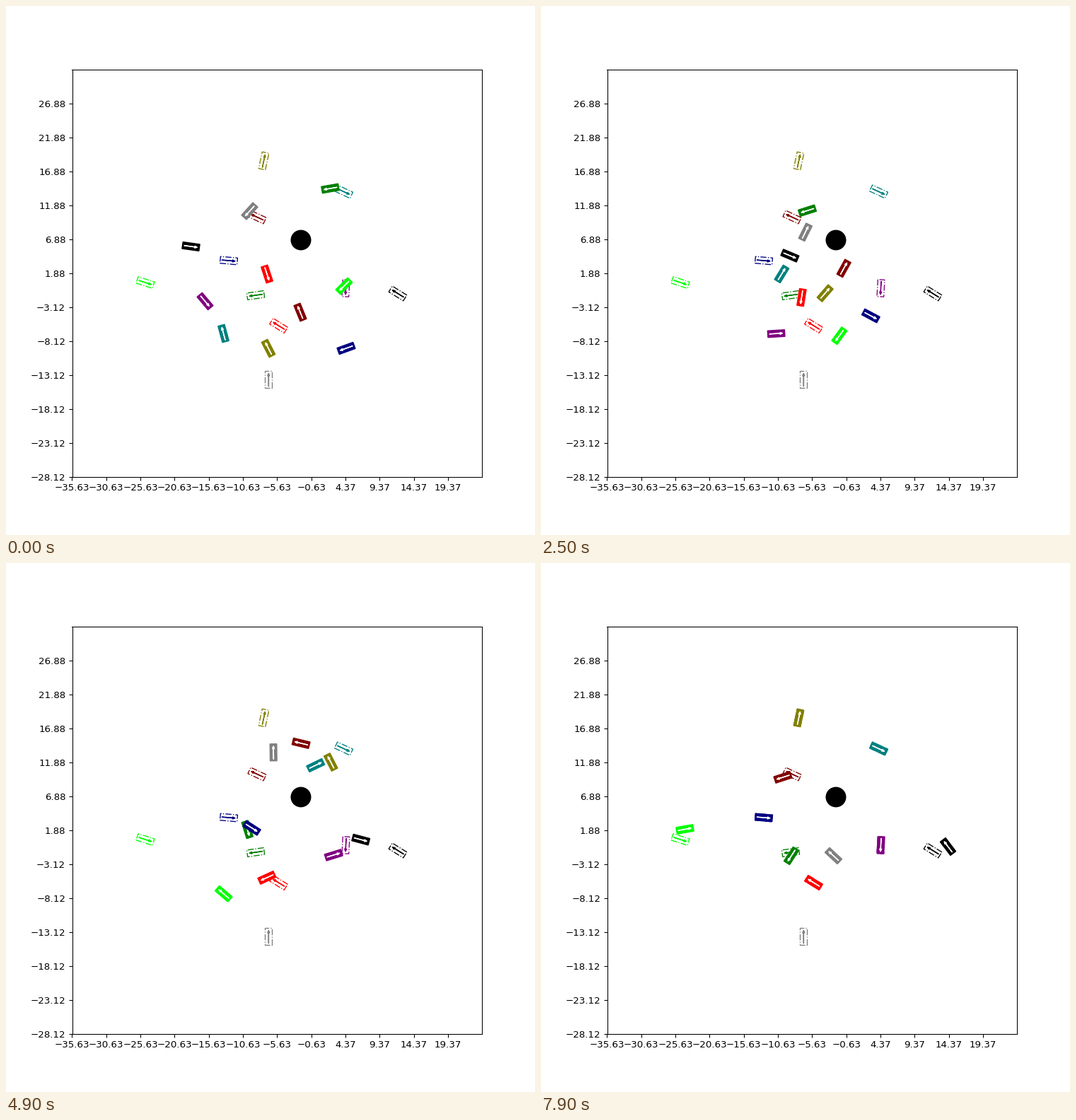
These frames come from a looping animation (748x748 px, 8000 ms). A matplotlib script:

```python
import numpy as np
import matplotlib.pyplot as plt
from matplotlib.animation import FuncAnimation
from matplotlib.patches import Circle, Polygon

SIZE, DPI = 748, 96
X0, Y0, SPAN = -35.63, -28.12, 60
STEPS = np.array([1, 17, 41, 64, 79])  # when each key pose is reached

# car body and heading arrow, both pointing along +x
BODY = np.array([(-1.25, -.5), (1.25, -.5), (1.25, .5), (-1.25, .5)])
ARROW = np.array([(-1, -.02), (.55, -.02), (.55, -.16), (.95, 0),
                  (.55, .16), (.55, .02), (-1, .02)])

fig, ax = plt.subplots(figsize=(SIZE / DPI, SIZE / DPI), dpi=DPI)
ax.set_xlim(X0, X0 + SPAN)
ax.set_ylim(Y0, Y0 + SPAN)
ax.set_xticks(X0 + np.arange(0, SPAN, 5))
ax.set_yticks(Y0 + np.arange(0, SPAN, 5))


def to_data(px, py):
    """Stage pixels, y downwards, to axes units."""
    x = X0 + (px / SIZE - .125) / .775 * SPAN
    y = Y0 + (.89 - py / SIZE) / .77 * SPAN
    return np.array([x, y])


def unit(deg):
    a = np.radians(deg)
    return np.array([np.cos(a), -np.sin(a)])


def turn(a, b):
    """Shortest signed angle from heading a to heading b."""
    return (b - a + 180) % 360 - 180


def place(shape, px, py, deg):
    a = np.radians(deg)
    c, s = np.cos(a), np.sin(a)
    return shape @ np.array([(c, s), (-s, c)]) + to_data(px, py)


def add_patch(shape, **style):
    return ax.add_patch(Polygon(shape, closed=True, **style))


class Car:
    """Drives through (x, y, heading) poses; a short list ends at the goal."""

    def __init__(self, color, goal, *poses):
        if len(poses) < len(STEPS):
            poses += (goal,)
        keys = np.array(poses, float)
        self.pos, self.head = keys[:, :2], keys[:, 2]
        self.speed = self.find_speeds()
        self.color = color
        add_patch(place(BODY, *goal), fill=False, ec=color, ls="-.")
        add_patch(place(ARROW, *goal), fc=color, ec=color)

    def find_speeds(self):
        """Arc speed of each leg, negative in reverse, averaged at the keys."""
        legs = []
        for i, span in enumerate(np.diff(STEPS)):
            chord = self.pos[i + 1] - self.pos[i]
            a, b = self.head[i:i + 2]
            gear = np.sign(chord @ (unit(a) + unit(b)))
            bend = np.cos(np.radians(turn(a, b) / 4)) ** 2
            legs.append(gear * np.hypot(*chord) / bend / span)
        legs = np.array(legs)
        middle = (legs[:-1] + legs[1:]) / 2
        return np.r_[legs[0] * .15, middle, legs[-1]]  # starts near rest

    def build(self):
        self.body = add_patch(BODY, fc=self.color, ec=self.color)
        self.arrow = add_patch(ARROW, fc="white", ec="white")

    def pose(self, step):
        i = min(np.searchsorted(STEPS, step, side="right") - 1, len(STEPS) - 2)
        span = STEPS[i + 1] - STEPS[i]
        u = (step - STEPS[i]) / span
        p, q = self.pos[i:i + 2]
        ha, hb = self.head[i:i + 2]
        va, vb = self.speed[i:i + 2]
        ta, tb = unit(ha) * va * span, unit(hb) * vb * span
        x, y = (p + (q - p) * u * u * (3 - 2 * u)
                + ta * u * (1 - u) ** 2 - tb * u * u * (1 - u))
        if va * vb > 0:
            dx, dy = (6 * u * (1 - u) * (q - p) + ta * (1 - u) * (1 - 3 * u)
                      + tb * u * (3 * u - 2)) * np.sign(va)
            return x, y, np.degrees(np.arctan2(-dy, dx))
        return x, y, ha + turn(ha, hb) * u  # changing gear: turn evenly

    def move(self, step):
        pose = self.pose(step)
        self.body.set_xy(place(BODY, *pose))
        self.arrow.set_xy(place(ARROW, *pose))


ax.add_patch(Circle(to_data(417, 331), 1.5, color="black", lw=0))

cars = [
    Car("red", (385.5, 452, 148), (369, 379, 288), (371, 395, 262),
        (363, 442, 238), (389, 452, 142)),
    Car("green", (353, 409, 188), (458.5, 258, 190), (419, 283, 176),
        (328.5, 342, 293), (349, 422.5, 256), (354, 414, 237)),
    Car("navy", (315, 360, -5), (481, 484, 200), (493, 464.5, 278),
        (373.5, 394, 320), (313, 360, 0)),
    Car("black", (554, 406.5, 148), (261.5, 340, -8), (311, 341, -3),
        (448, 382.5, 2), (571.5, 398, 77), (575.5, 401, 127)),
    Car("purple", (480.5, 399, 267), (281.5, 417.5, -50), (296.5, 450, -62),
        (434.5, 427, 33), (491, 413, -45)),
    Car("teal", (477.5, 262.5, -25), (307.5, 463, 105), (323.5, 417.5, 78),
        (403, 307, 38), (489, 264, 30)),
    Car("olive", (364.5, 219, 78), (371, 484, 117), (373.5, 438.5, 50),
        (460.5, 324, 64), (394, 238.5, 180)),
    Car("maroon", (355, 298.5, 155), (416, 433, 112), (412.5, 405.5, 79),
        (449.5, 282, 110), (353, 280.5, 258), (342, 303, 198)),
    Car("lime", (197, 391, -18), (478, 396, 225), (449.5, 431, 222),
        (351, 503, 145), (221.5, 414, 170), (203.5, 376.5, 10)),
    Car("gray", (371.3, 528.3, 90), (344.5, 290, 228), (353.5, 331, -22),
        (384, 264, 98), (356.5, 319.5, 77), (413.5, 414, 137)),
]
for car in cars:
    car.build()


def draw(frame):
    for car in cars:
        car.move(max(frame, 1))
    return []


anim = FuncAnimation(fig, draw, frames=80, interval=100, repeat=True,
                     repeat_delay=0, blit=False)
plt.show()
```
